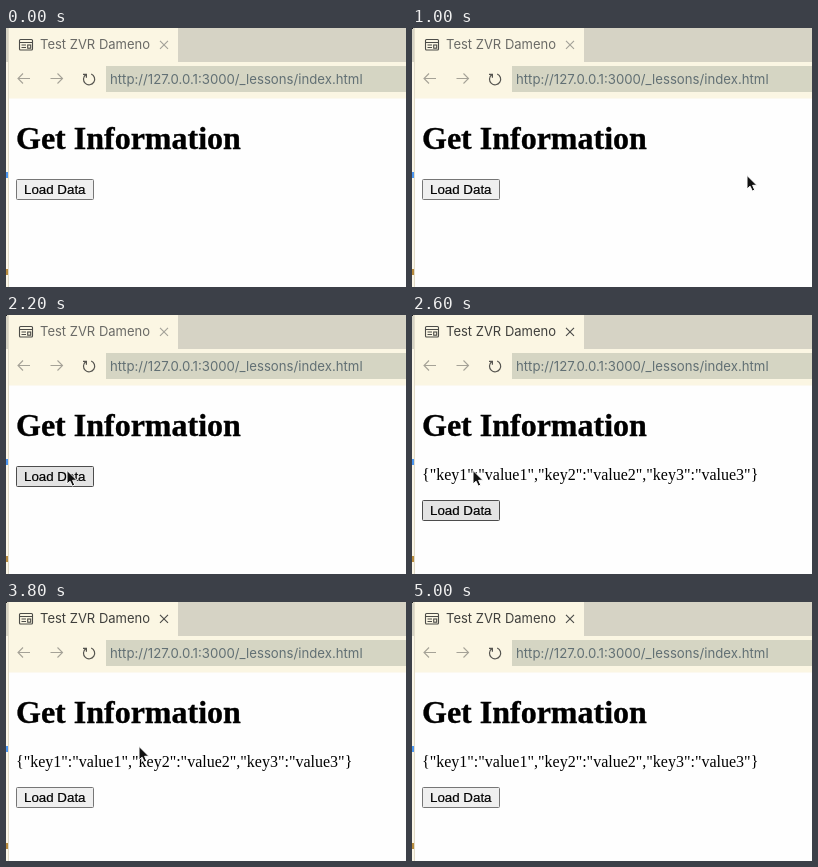
Write an HTML page that moves like this. It is 400 px wide and 259 px high and loops after 5.8 s.

```html
<!DOCTYPE html>
<html lang="en">
<head>
<meta charset="utf-8">
<style>
  html, body { margin: 0; width: 100%; height: 100%; overflow: hidden; background: #fefefe; }
  svg { display: block; width: 400px; height: 259px; }
  .ui { font: 13px Inter, sans-serif; }
  .ui .url { font-size: 13.2px; }
  .page { font: 16px "Liberation Serif", "Times New Roman", serif; }
  .page .head { font-size: 32px; font-weight: bold; stroke: #000; stroke-width: .35; }
  .label { font: 13.333px "Liberation Sans", Arial, sans-serif; stroke: #000; stroke-width: .2; }
  .line { fill: none; stroke-width: 1.1; }
</style>
</head>
<body>
<svg viewBox="0 0 400 259">
  <rect width="400" height="259" fill="#fefefe"/>

  <!-- Edge of the neighbouring pane -->
  <rect width="2" height="259" fill="#fcf7e8"/>
  <rect width="2" height="34" fill="#d6d3c5"/>
  <rect x="2" width="1" height="259" fill="#e2dcc9"/>
  <rect y="144" width="2" height="6" fill="#4a94ee"/>
  <rect y="241" width="2" height="6" fill="#b78a3c"/>
  <rect id="corner" width="1" height="1" fill="#222"/>

  <!-- Tab strip and toolbar -->
  <rect x="3" width="397" height="34" fill="#d6d3c5"/>
  <rect x="3" width="169" height="34" fill="#fbf6e3"/>
  <rect x="3" y="34" width="397" height="36.5" fill="#fbf6e3"/>
  <rect x="100" y="38" width="300" height="26" fill="#d5d5c3"/>

  <g class="line" stroke="#4c4c48">
    <rect x="13.5" y="11.5" width="13" height="10.5" rx="1"/>
    <path d="M13.5 14.5h13M15.5 17h4.5M15.5 19.5h4.5"/>
    <rect x="21.7" y="17" width="3" height="3.2"/>
  </g>
  <g class="line" stroke="#a5a297">
    <path d="M24 50.5H12M17 45.5l-5 5 5 5"/>
    <path d="M44.5 50.5h12M51.5 45.5l5 5-5 5"/>
  </g>
  <path class="line" stroke="#55544f" style="stroke-width:1.2"
        d="M79.6 46.8a5.6 5.6 0 1 0 5.6-.8M77 46.3h3.4v3.4"/>
  <g class="ui">
    <text id="title" x="34" y="21">Test ZVR Dameno</text>
    <text class="url" x="104" y="56" fill="#627074">http://127.0.0.1:3000/_lessons/index.html</text>
  </g>
  <path id="close" class="line" d="M154 12.8l8 8m0-8l-8 8"/>

  <!-- Page -->
  <g class="page">
    <text class="head" x="10" y="121">Get Information</text>
    <text id="result" x="10" y="165">{"key1":"value1","key2":"value2","key3":"value3"}</text>
  </g>
  <g id="button">
    <rect id="face" x="10.5" y="151.5" width="77" height="20" rx="1"/>
    <text class="label" x="18" y="166">Load Data</text>
  </g>

  <path id="cursor" fill="#111" stroke="#fff" stroke-width="1" stroke-linejoin="round"
        d="M0-.6v13.6l3.1-2.8 2.2 4.9 2.4-1.1-2.1-4.7h4.3z"/>
</svg>
<script>
  const LOOP = 5800, STEP = 200;
  const LOADED = 2600;

  // Pointer stops: time, x, y; without a place the pointer is hidden.
  const stops = [
    [0], [1000, 335, 148], [1200, 212, 165], [1400, 110, 162], [1600, 68, 153],
    [1800, 61, 156], [3800, 133, 145], [4000, 221, 148], [4200, 249, 144],
    [4800, 230, 205], [5000]
  ];

  const el = id => document.getElementById(id);
  const set = (id, name, value) => el(id).setAttribute(name, value);
  const show = (id, on) => set(id, "visibility", on ? "visible" : "hidden");

  function draw(t) {
    const loaded = t >= LOADED;
    const active = t >= 2000 && t < 3800;

    show("corner", t >= 400);
    show("result", loaded);
    set("title", "fill", loaded ? "#3f3f3c" : "#6a6a66");
    set("close", "stroke", loaded ? "#4a4a47" : "#a3a198");
    set("button", "transform", `translate(0 ${loaded ? 34 : 0})`);
    set("face", "fill", active ? "#e3e3e3" : "#efefef");
    set("face", "stroke", active ? "#4c4c4c" : "#767676");

    const [, x, y] = stops.filter(s => s[0] <= t).pop();
    show("cursor", x !== undefined);
    if (x !== undefined) set("cursor", "transform", `translate(${x} ${y})`);
  }

  const start = performance.now();
  function tick() {
    const t = (performance.now() - start) % LOOP;
    draw(Math.floor(t / STEP) * STEP);
    requestAnimationFrame(tick);
  }
  tick();
</script>
</body>
</html>
```
